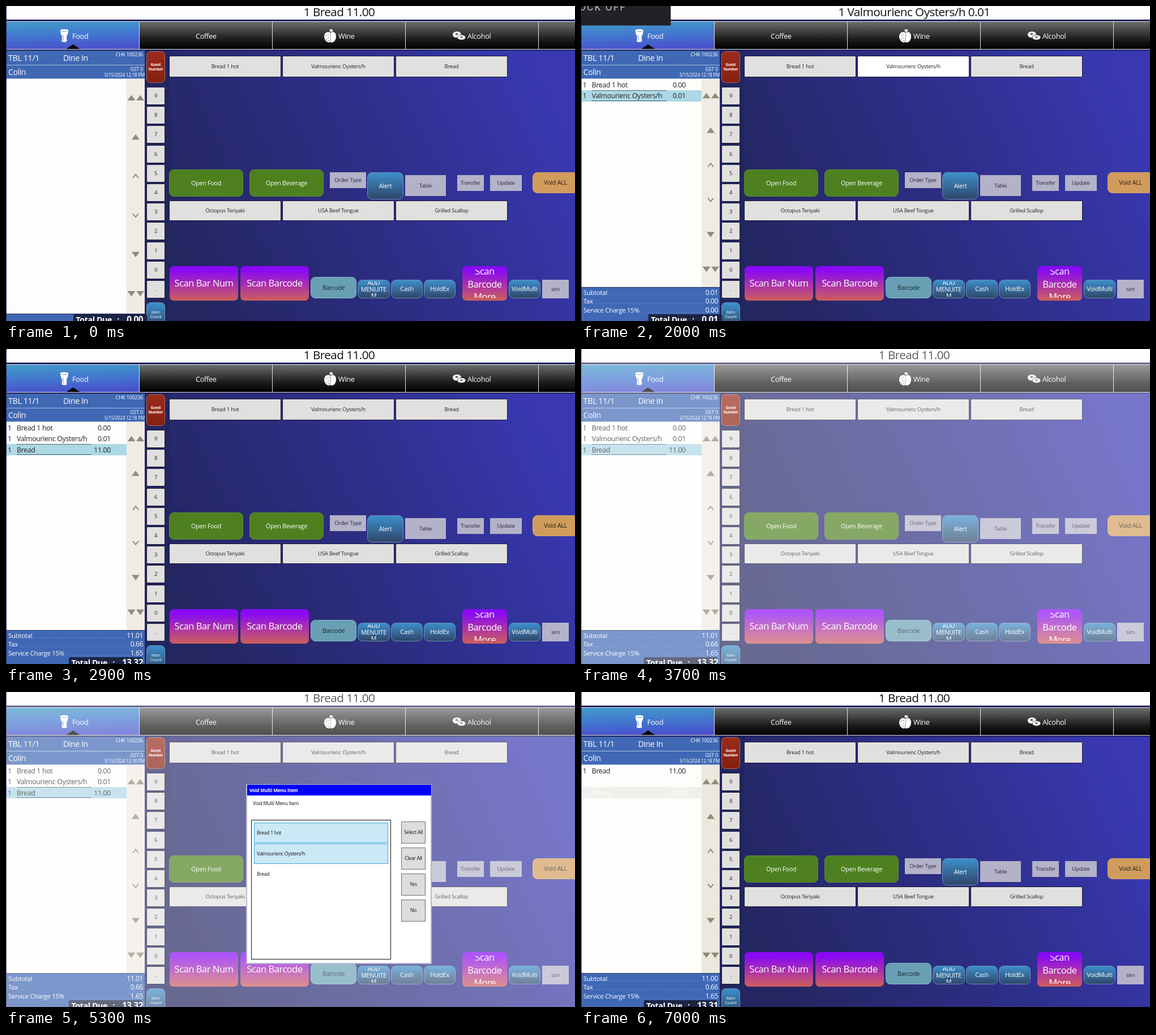
Animation of 1005 by 557 pixels, one loop 8000 ms. Source, as an HTML page:

```html
<!DOCTYPE html>
<html lang="en">
<head>
<meta charset="utf-8">
<title>Order screen</title>
<style>
html, body { margin: 0; width: 100%; height: 100%; overflow: hidden; background: #24265f; }
svg { display: block; width: 100vw; height: 100vh; }
text { font-family: "Open Sans", "Noto Sans", sans-serif; letter-spacing: -.027em; white-space: pre; }
</style>
</head>
<body>
<svg id="stage" viewBox="0 0 1005 557" preserveAspectRatio="none">
  <defs>
    <linearGradient id="back" gradientUnits="userSpaceOnUse" x1="310" y1="440" x2="960" y2="150">
      <stop offset="0" stop-color="#242661"/><stop offset=".5" stop-color="#2d2e86"/><stop offset="1" stop-color="#3938b2"/>
    </linearGradient>
    <linearGradient id="tab" x2="0" y2="1">
      <stop offset="0" stop-color="#6c6c6c"/><stop offset=".65" stop-color="#1a1a1a"/><stop offset="1" stop-color="#000"/>
    </linearGradient>
    <linearGradient id="tabOn" x2=".15" y2="1">
      <stop offset="0" stop-color="#419bc8"/><stop offset=".55" stop-color="#4276cf"/><stop offset="1" stop-color="#4a52cc"/>
    </linearGradient>
    <linearGradient id="blue" x2="0" y2="1">
      <stop offset="0" stop-color="#3d90cd"/><stop offset="1" stop-color="#2f4668"/>
    </linearGradient>
    <linearGradient id="scan" x2="0" y2="1">
      <stop offset="0" stop-color="#8a06fb"/><stop offset=".15" stop-color="#8a0cf0"/><stop offset="1" stop-color="#cf5e5a"/>
    </linearGradient>
    <linearGradient id="red" x2="0" y2="1">
      <stop offset="0" stop-color="#9a2b1b"/><stop offset="1" stop-color="#86200f"/>
    </linearGradient>
    <clipPath id="clipMore"><rect x="806" y="466" width="80" height="50"/></clipPath>
    <clipPath id="clipAdd"><rect x="622" y="487" width="56" height="27"/></clipPath>
  </defs>
  <g id="base"></g>
  <g id="live"></g>
</svg>
<script>
const LOOP = 8000;
const $ = id => document.getElementById(id);

const rect = (x, y, w, h, fill, extra = '') =>
  `<rect x="${x}" y="${y}" width="${w}" height="${h}" fill="${fill}" ${extra}/>`;
const path = (d, fill, extra = '') => `<path d="${d}" fill="${fill}" ${extra}/>`;
const text = (x, y, str, size, fill = '#fff', anchor = 'start', weight = 460) =>
  `<text x="${x}" y="${y}" font-size="${(size * 1.045).toFixed(2)}" fill="${fill}" text-anchor="${anchor}" font-weight="${weight}">${str}</text>`;
const mid = (x, y, str, size, fill, weight) => text(x, y, str, size, fill, 'middle', weight);
const end = (x, y, str, size, fill, weight) => text(x, y, str, size, fill, 'end', weight);

// Button with a centred label and, if given, a one pixel edge
function button(x, y, w, h, label, { fill, edge, ink = '#fff', r = 8, size = 10.4 }) {
  const box = edge
    ? rect(x + .5, y + .5, w - 1, h - 1, fill, `rx="${r}" stroke="${edge}"`)
    : rect(x, y, w, h, fill, `rx="${r}"`);
  return box + (label ? mid(x + w / 2, y + h / 2 + size * .36, label, size, ink) : '');
}
const GREEN = { fill: '#4e8020', edge: '#5f8e35', size: 10.3 };
const GREY = { fill: '#b3b2c8', ink: '#26263a', r: 0, size: 9.2 };
const BLUE = { fill: 'url(#blue)', edge: '#6c90b4' };
const SCAN = { fill: 'url(#scan)', r: 7, size: 15.8 };
const ITEM = { fill: '#e2e0de', edge: '#17183c', ink: '#222', r: 2, size: 9.1 };

const MENU = ['Bread 1 hot', 'Valmourienc Oysters/h', 'Bread'];
const PRICES = ['0.00', '0.01', '11.00'];

function tabs() {
  let s = rect(0, 24, 1005, 55, '#20235c') + rect(1, 28, 235, 49, 'url(#tabOn)') +
    rect(236, 28, 769, 49, 'url(#tab)');
  s += path('M1 27.5H1005M1 76.5H1005M235.5 28V77M470.5 28V77M705.5 28V77M940.5 28V77', 'none', 'stroke="#e0e0e8"');
  s += path('M106.5 76L118.5 68L130.5 76Z', '#000');
  s += text(117, 58, 'Food', 12.2) + text(335, 58, 'Coffee', 12.2) +
    text(587, 58, 'Wine', 12.2) + text(815, 58, 'Alcohol', 12.2);
  // glass
  s += path('M96 42q7-2 14 0l-.5 6-2.500 6 .5 9q-4.500 1.500-9 0l.5-9-2.500-6z', '#fff') +
    path('M98.5 45H107.500M100.500 51l1 10', 'none', 'stroke="#5b86cc" stroke-width=".9"');
  // fruit
  s += path('M573 47c-6-3-11 1-11 7 0 6 5 12 10.500 10z', '#fff') +
    path('M573.500 47c6-3 9.500 1 9.500 7 0 6-4 12-10 10z', '#fff') +
    path('M573 46q-3-4 0-5 4 0 5 3-3 2-5 2z', '#fff') +
    path('M566 52v1M569 56v1M566 59v1M570 61v1M569 50v1', 'none', 'stroke="#222" stroke-width="1.300"');
  // rings
  s += '<ellipse cx="796.500" cy="50.500" rx="7.500" ry="5.500" fill="#fff"/><ellipse cx="804.500" cy="55.500" rx="7.500" ry="4.500" fill="#fff" stroke="#222" stroke-width=".8"/>' +
    '<ellipse cx="796" cy="49.500" rx="2.500" ry="1.200" fill="#333"/><ellipse cx="804.500" cy="55" rx="2.500" ry="1.100" fill="#333"/>';
  return s;
}

function keypad() {
  let s = button(248, 80, 33, 56, '', { fill: 'url(#red)', edge: '#ad6a62', r: 7 }) +
    mid(264.5, 106, 'Guest', 6.2, '#fff', 700) + mid(264.5, 114, 'Number', 6.2, '#fff', 700);
  [...'9876543210.'].forEach((key, i) => {
    s += button(248, Math.round(143 + i * 34.2), 33, 32, key, { ...ITEM, size: 9.2 });
  });
  return s + button(248, 524, 33, 46, '', { ...BLUE, r: 7 }) +
    mid(264.5, 544, 'Item', 7.3) + mid(264.5, 552, 'Count', 7.3);
}

function panel() {
  let s = '';
  ['Octopus Teriyaki', 'USA Beef Tongue', 'Grilled Scallop'].forEach((name, i) => {
    s += button(288 + i * 200, 344, 198, 36, name, ITEM);
  });
  s += button(288, 289, 131, 48, 'Open Food', GREEN) + button(430, 289, 131, 48, 'Open Beverage', GREEN);
  s += button(572, 294, 64, 28, 'Order Type', GREY) + button(638, 294, 64, 48, 'Alert', BLUE) +
    button(705, 299, 72, 37, 'Table', GREY) + button(797, 299, 47, 28, 'Transfer', GREY) +
    button(855, 299, 56, 28, 'Update', GREY);
  s += button(930, 294, 81, 37, 'Void ALL', { fill: '#d09c5c', edge: '#d6a86c', ink: '#2a2118' });
  s += button(289, 460, 121, 61, 'Scan Bar Num', SCAN) + button(414, 460, 121, 61, 'Scan Barcode', SCAN) +
    button(806, 460, 79, 61, '', SCAN);
  s += '<g clip-path="url(#clipMore)">' +
    ['Scan', 'Barcode', 'More'].map((w, i) => mid(845.5, 475 + i * 22.5, w, 15.8)).join('') + '</g>';
  s += button(538, 479, 81, 38, 'Barcode', { fill: '#699fb4', edge: '#84b4c4', ink: '#1c2a33' });
  s += button(621, 484, 57, 33, '', BLUE) + '<g clip-path="url(#clipAdd)">' +
    ['ADD', 'MENUITE', 'M'].map((w, i) => mid(649.5, 493 + i * 11.7, w, 10.4)).join('') + '</g>';
  s += button(680, 484, 56, 33, 'Cash', BLUE) + button(738, 484, 56, 33, 'HoldEx', BLUE) +
    button(888, 484, 56, 33, 'VoidMulti', BLUE) + button(947, 484, 47, 33, 'sim', GREY);
  return s;
}

function header() {
  return rect(1, 79, 244, 50, '#4068b4') + path('M1 104.5H245M1 128.5H245', 'none', 'stroke="#a9bde2"') +
    text(4, 97, 'TBL 11/1', 13.7) + text(101, 97, 'Dine In', 13.4) + text(4, 122, 'Colin', 13.4) +
    end(242, 89, 'CHK 100236', 8.6) + end(242, 115, 'GST 0', 8.6) + end(245, 125, '5/15/2024 12:18 PM', 7.7);
}

function arrows(height) {
  const at = i => 128 + height * (i + .5) / 6;
  const tri = (x, y, d) => path(`M${x - 7} ${y + 4.5 * d}h14l-7 ${-9.5 * d}z`, '#918b79');
  const vee = (y, d) => path(`M224 ${y + 3 * d}l5 ${-6 * d}l5 ${6 * d}`, 'none', 'stroke="#918b79" stroke-width="2"');
  return tri(221.5, at(0), 1) + tri(237, at(0), 1) + tri(229, at(1), 1) + vee(at(2), 1) +
    vee(at(3), -1) + tri(229, at(4), -1) + tri(221.5, at(5), -1) + tri(237, at(5), -1);
}

function row(i, item, ink = '#222') {
  const y = 143.5 + i * 19.7;
  return text(3, y, '1', 11.8, ink) + text(19, y, MENU[item], 11.8, ink) + end(185, y, PRICES[item], 11.8, ink);
}

function order(t) {
  const count = (t >= 1700) + (t >= 2000) + (t >= 2500);
  const voided = t >= 7000;
  const full = count > 1;
  const height = full ? 368 : 415;
  let s = rect(1, 129, 212, height, '#fdfdfc') + rect(213, 129, 32, height, voided ? '#ebe8de' : '#f0ebe4') + arrows(height);
  if (voided) {
    s += row(0, 2) + rect(1, 168, 212, 20, '#f1f0ed') + row(2, 2, '#fff');
  } else {
    if (count) {
      const y = 129 + Math.round((count - 1) * 19.6);
      s += rect(1, y, 212, 20, '#add8e6') +
        path(`M19 ${y + .5}H151M19 ${y + 18.5}H151`, 'none', 'stroke="#4d6670"');
    }
    for (let i = 0; i < count; i++) s += row(i, i);
  }

  const sums = voided ? ['11.00', '0.66', '1.65', '13.31']
    : count > 2 ? ['11.01', '0.66', '1.65', '13.32']
    : full ? ['0.01', '0.00', '0.00', '0.01'] : ['', '', '', '0.00'];
  const top = full ? 498 : 545;
  s += rect(1, top, 244, 60, '#4068b4');
  if (full) {
    s += path('M1 497.5H245', 'none', 'stroke="#20305f"');
    [['Subtotal', 50], ['Tax', 24], ['Service Charge 15%', 108]].forEach(([label, x], i) => {
      const y = 510.5 + i * 15.7;
      s += path(`M${x} ${y}H${i ? 217 : 211}`, 'none', 'stroke="#7f9acf" stroke-dasharray="1 2"') +
        text(4, y, label, 11) + end(242, y, sums[i], 11.4);
    });
  }
  const shift = sums[3].length > 4 ? -8 : 0;
  s += rect(119 + shift, 545, 130, 20, '#1b2444', 'rx="3"');
  s += end(187 + shift, 560, 'Total Due', 13.6, '#fff', 700) + end(200 + shift, 560, ':', 13.6, '#fff', 700) +
    end(242, 560, sums[3], 14.6, '#fff', 700);
  return s;
}

function dialog(t) {
  let s = rect(425, 164, 326, 316, '#fff', 'stroke="#b9b9d2" stroke-width="2"') +
    rect(426, 164, 325, 19, '#00f') +
    text(430, 177, 'Void Multi Menu Item', 8, '#fff', 'start', 700) +
    text(436, 200, 'Void Multi Menu Item', 8.2, '#111') +
    rect(433.5, 226.5, 246, 246, '#fff', 'stroke="#111"');
  const hover = t < 4000 ? -1 : t < 4100 ? 2 : t < 4200 ? 1 : t < 4600 ? 0 : t < 4700 ? 1 : t < 4800 ? 2 : 1;
  MENU.forEach((name, i) => {
    const y = 231.5 + Math.round(i * 36.7);
    const picked = t >= [4400, 5200, LOOP][i];
    if (picked) s += rect(438.5, y, 236, 35, '#cbe8f6', 'stroke="#3ba9dd"');
    else if (hover === i) s += rect(438.5, y, 236, 35, '#e5f3fb', 'stroke="#70c0e7"');
    s += text(443, y + 20.5, name, 8.1, '#111');
  });
  ['Select All', 'Clear All', 'Yes', 'No'].forEach((label, i) => {
    s += button(698, 229 + i * 46, 43, 39, label, { fill: '#ddd', edge: '#707070', ink: '#111', r: 0, size: 8.2 });
  });
  return s;
}

function live(t) {
  const titleItem = t >= 1700 && t < 2000 ? 0 : t >= 2000 && t < 2500 ? 1 : 2;
  const pressed = [1700, 2000, 2500].findIndex(p => t >= p && t < p + 100);
  let s = mid(588.5, 18, `1 ${MENU[titleItem]} ${PRICES[titleItem]}`, 19.8, '#111');
  MENU.forEach((name, i) => {
    s += button(288 + i * 200, 88, 198, 38, name, i === pressed ? { ...ITEM, fill: '#fff' } : ITEM);
  });
  s += order(t);
  if (t >= 1400 && t < 2900) {
    s += `<g opacity="${t < 2800 ? 1 : .5}">` + rect(0, 0, 158.5, 34.5, '#212126') +
      `<text x="80" y="7.5" font-size="16" font-weight="500" fill="#b4b4bc" text-anchor="end" style="font-family:Inter,sans-serif;letter-spacing:.12em">CLOCK OFF</text></g>`;
  }
  const dim = t < 3700 || t >= 6700 ? 0 : t < 6600 ? .31 : .15;
  if (dim) s += rect(0, 0, 1005, 557, '#fff', `opacity="${dim}"`);
  if (t >= 3800 && t < 6500) s += dialog(t);
  return s;
}

$('base').innerHTML = rect(0, 0, 1005, 557, 'url(#back)') + rect(1, 0, 1004, 24, '#fdfdfd') +
  rect(0, 78, 289, 479, '#22265f') + tabs() + header() + keypad() + panel();

// Every change falls on a tenth of a second
let shown = -1;
function tick() {
  const step = Math.floor(performance.now() % LOOP / 100);
  if (step !== shown) {
    shown = step;
    $('live').innerHTML = live(step * 100);
  }
  requestAnimationFrame(tick);
}
tick();
</script>
</body>
</html>
```
